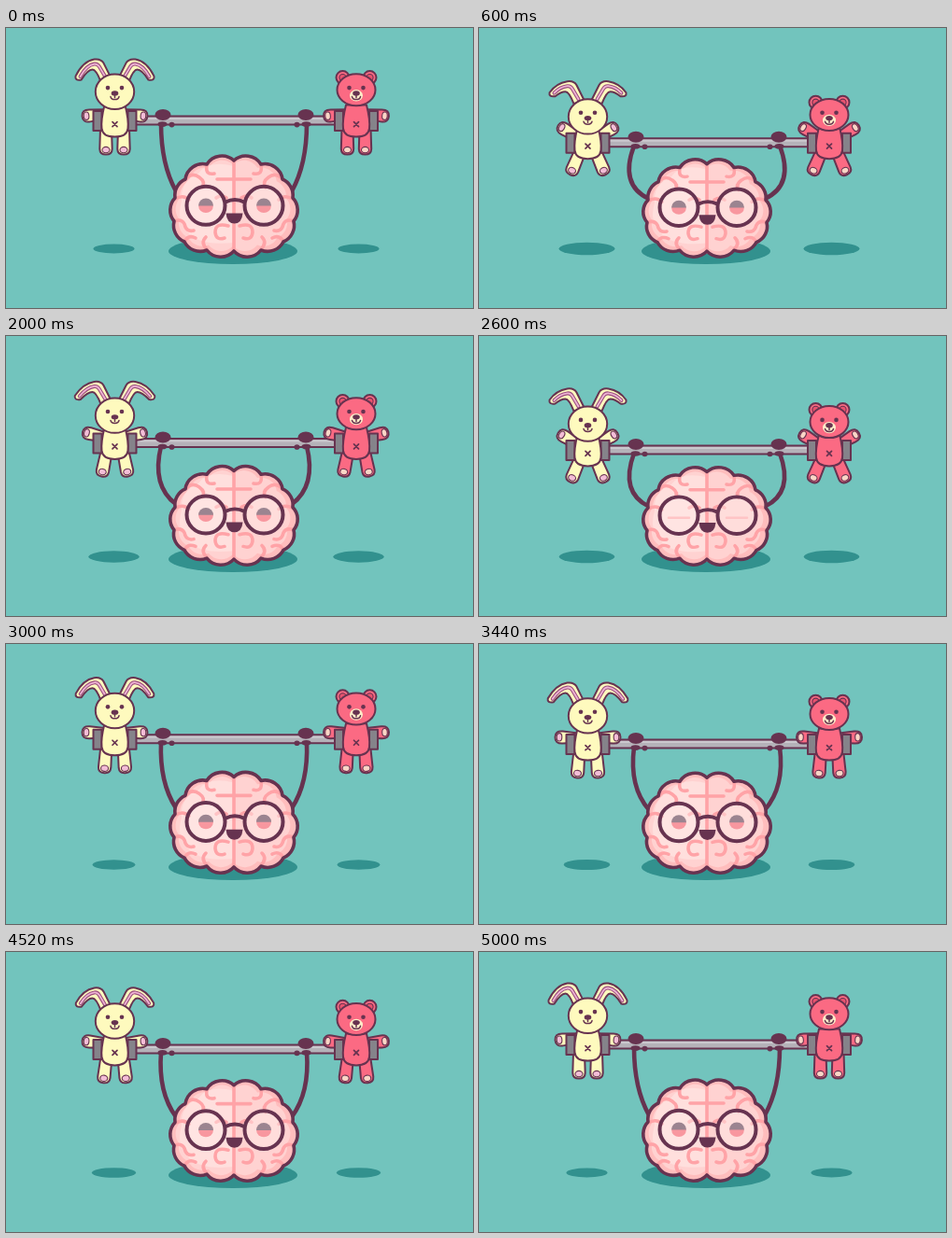
Animation of 500 by 300 pixels, one loop 5.04 s. Source, as an HTML page:

```html
<!DOCTYPE html>
<html lang="en">
<head>
<meta charset="utf-8">
<title>Brain workout</title>
<style>
  html, body { margin: 0; width: 100%; height: 100%; overflow: hidden; background: #72c4bd; }
  svg { display: block; width: 100%; height: 100%; }
</style>
</head>
<body>
<svg id="stage" viewBox="0 0 500 300" stroke-linecap="round" stroke-linejoin="round"></svg>
<script>
const LOOP = 5040;
const INK = '#673350';
const EDGE = `stroke="${INK}" stroke-width="2"`;
const THIN = `stroke="${INK}" stroke-width="1.1"`;
const stage = document.getElementById('stage');

const both = draw => [-1, 1].map(side => `<g transform="scale(${side} 1)">${draw()}</g>`).join('');
const ellipse = (x, y, rx, ry, fill, extra = '') =>
  `<ellipse cx="${x}" cy="${y}" rx="${rx}" ry="${ry}" fill="${fill}" ${extra}/>`;
const shape = (d, fill, extra = '') => `<path d="${d}" fill="${fill}" ${extra}/>`;
const line = (d, color, width, extra = '') =>
  shape(d, 'none', `stroke="${color}" stroke-width="${width}" ${extra}`);

function toy({ x, fur, pad, ears, head }) {
  const arm = shape('M-3-5L15-6.500Q23-7 23 0Q23 7 15 6.500L-3 5Z', fur, EDGE) +
    ellipse(18.5, 0, 2.8, 4.2, pad, THIN);
  const leg = shape('M-6-4L-6.700 18Q-6.500 24 0 24Q6.500 24 6.700 18L6-4Z', fur, EDGE) +
    ellipse(0, 19, 4, 3.2, pad, THIN);
  return `<g transform="translate(${x} 0)"><g class="lift">
    ${both(() => `
      <g transform="translate(12 -6)"><g class="arm">${arm}</g></g>
      <g transform="translate(9.5 13)"><g class="leg">${leg}</g></g>
      <rect x="14" y="-9.500" width="9" height="21" fill="#85838a" ${EDGE}/>`)}
    ${shape('M-11-16Q-15 0-14 9Q-13 18 0 18Q13 18 14 9Q15 0 11-16Z', fur, EDGE)}
    ${line('M-2.500 2l5 5m0-5l-5 5', INK, 1.7)}
    ${ears}
    <g class="head">
      ${head}
      ${both(() => ellipse(7.5, -34.5, 2.3, 2.3, INK))}
      ${ellipse(0, -28.7, 3.8, 2.6, INK)}
      ${line('M0-28V-24M-4.500-25Q-4-22 0-22Q4-22 4.500-25', INK, 1.5)}
    </g>
  </g></g>`;
}

const rabbit = {
  x: 116.5, fur: '#fefabe', pad: '#f3bdd6',
  ears: both(() => shape('', '#fefabe', `class="ear" ${EDGE}`) +
    line('', '#9d4f80', 4, 'class="stripe"') + line('', '#eeb4d3', 1.8, 'class="stripe"')),
  head: ellipse(0, -30.3, 20.7, 18.7, '#fefabe', EDGE)
};
const bear = {
  x: 375, fur: '#fb6a83', pad: '#fbd5c6', ears: '',
  head: both(() => ellipse(14.5, -45.5, 7, 7, '#fb6a83', EDGE) +
    ellipse(14.5, -45.5, 3.6, 3.6, '#e9536f', THIN)) +
    ellipse(0, -32.3, 20.5, 17, '#fb6a83', EDGE) + ellipse(0, -26.3, 7, 6.2, '#fdedc9')
};

// Valleys of the left half of the brain, measured from its middle bottom.
const valleys = [[0, -102], [-29, -98], [-52, -82], [-63, -62], [-64, -37], [-53, -15], [-29, -6], [0, -5]];
const outline = 'M0-102' +
  valleys.slice(1).map(([x, y]) => `A19 19 0 0 0 ${x} ${y}`).join('') +
  valleys.slice(0, -1).reverse().map(([x, y]) => `A19 19 0 0 0 ${-x} ${y}`).join('') + 'Z';
const folds = `M0-82H-18M-29-97Q-31-86-21-88M-52-82Q-45-90-37-84Q-30-79-34-73
  M-63-61Q-54-66-48-60M-64-37Q-56-40-53-34Q-51-25-43-27M-53-15Q-49-23-41-19
  M-29-7Q-36-14-30-20M-6-32Q-20-36-20-25Q-19-16-10-19M-8-62Q-14-66-19-62`;

const brain = `<g transform="translate(245 244)"><g id="brain">
  <g transform="translate(-1 0)">
    ${shape(outline, '#ffbdbd')}
    ${shape(outline, '#ffd2d1', 'transform="translate(-1 -6) scale(.9)"')}
    ${shape('M0-96Q-28-103-38-88Q-58-80-56-58Q-62-38-50-26Q-38-10 0-14Z', '#ffdfdd')}
    ${both(() => line(folds, '#ffa3a7', 3.6))}
    ${line('M0-102V-4', '#ffa3a7', 3.6)}
    ${line(outline, INK, 3.6)}
  </g>
  ${both(() => ellipse(31, -53.7, 20.5, 20.5, '#ffe8e6', 'fill-opacity=".45"'))}
  <g id="open">${both(() => ellipse(31, -53, 7.8, 7, '#f8979f') +
    shape('M23-53.500A8 8 0 0 1 39-53.500Z', '#9b8490'))}</g>
  <g id="shut">${both(() => line('M20-51H42', '#ffc4c5', 2.5))}</g>
  ${both(() => ellipse(31, -53.7, 20.5, 20.5, 'none', `stroke="${INK}" stroke-width="4"`))}
  ${line('M-10-57.500Q0-62.500 10-57.500', INK, 4)}
  ${shape('M-9.500-45.500H8.500Q7.500-34.500-.5-34.500Q-8.500-34.500-9.500-45.500Z', INK)}
</g></g>`;

stage.innerHTML = `
  <rect width="500" height="300" fill="#72c4bd"/>
  ${ellipse(243, 239, 69, 14, '#32918e')}
  ${[115.5, 377.5].map(x => ellipse(x, 236.5, 22, 5, '#32918e', 'class="shadow"')).join('')}
  <g transform="translate(244 0)">${both(() => line('', INK, 4.6, 'class="muscle"'))}</g>
  ${brain}
  <g class="lift">
    <rect x="130" y="-4" width="230" height="9" fill="#b5b2b9" ${EDGE}/>
    ${line('M139-1.500H351', '#cbc8ce', 2)}
    <g transform="translate(244.5 0)">${both(() =>
      ellipse(76.5, -5.5, 8.5, 6, INK) + ellipse(77, 4.5, 5, 2.8, INK) + ellipse(67, 5, 3, 2.8, INK))}</g>
  </g>
  ${toy(rabbit)}
  ${toy(bear)}`;

const set = (selector, name, value) =>
  stage.querySelectorAll(selector).forEach(el => el.setAttribute(name, value));
const place = (selector, value) => set(selector, 'transform', value);

// Midpoints of each lowering and raising.
const lowerings = [212, 1962, 3483];
const raisings = [1125, 2832, 4400];
const ease = (t, middle, length) => {
  const p = Math.min(1, Math.max(0, (t - middle) / length + .5));
  return (1 - Math.cos(Math.PI * p)) / 2;
};

// 0 with the bar up, 1 with the bar down.
function depth(t) {
  t = (t + LOOP) % LOOP;
  return lowerings.reduce((sum, middle, i) =>
    sum + ease(t, middle, 400) - ease(t, raisings[i], 600), 0);
}

function render(t) {
  const d = depth(t);
  const swing = depth(t - 40);
  const flare = Math.max(0, d - depth(t - 80));
  const bar = 98.6 + 23.6 * d;

  place('.lift', `translate(0 ${bar})`);
  place('.head', `translate(0 ${3 * swing})`);
  place('.arm', `rotate(${5 - 36 * swing})`);
  place('.leg', `rotate(${-23 * swing})`);
  place('#brain', `scale(1 ${1 - .036 * d})`);

  const tipX = 42 - swing + 4 * flare;
  const tipY = -47 - 6 * swing;
  set('.ear', 'd', `M4-45L12-61Q15-66 22-65Q34-63 ${tipX} ${tipY}
    Q${tipX + 1} ${tipY + 5} ${tipX - 6} ${tipY + 4}Q29-54 24-54Q20-54 15-41Z`);
  set('.stripe', 'd', `M10-46L16.500-57Q18.500-60.500 22-60Q30-59 ${tipX - 5} ${tipY + .5}`);
  set('.muscle', 'd', `M78 ${bar + 4}Q${78 + 16 * d} ${146 + 22 * d} 62 ${175 + 8 * d}`);
  set('.shadow', 'rx', 22 + 8 * d);
  set('.shadow', 'ry', 5 + 1.8 * d);

  const blinking = Math.abs(t % 1680 - 920) < 100;
  set('#open', 'visibility', blinking ? 'hidden' : 'visible');
  set('#shut', 'visibility', blinking ? 'visible' : 'hidden');
}

function tick() {
  render(performance.now() % LOOP);
  requestAnimationFrame(tick);
}
tick();
</script>
</body>
</html>
```
